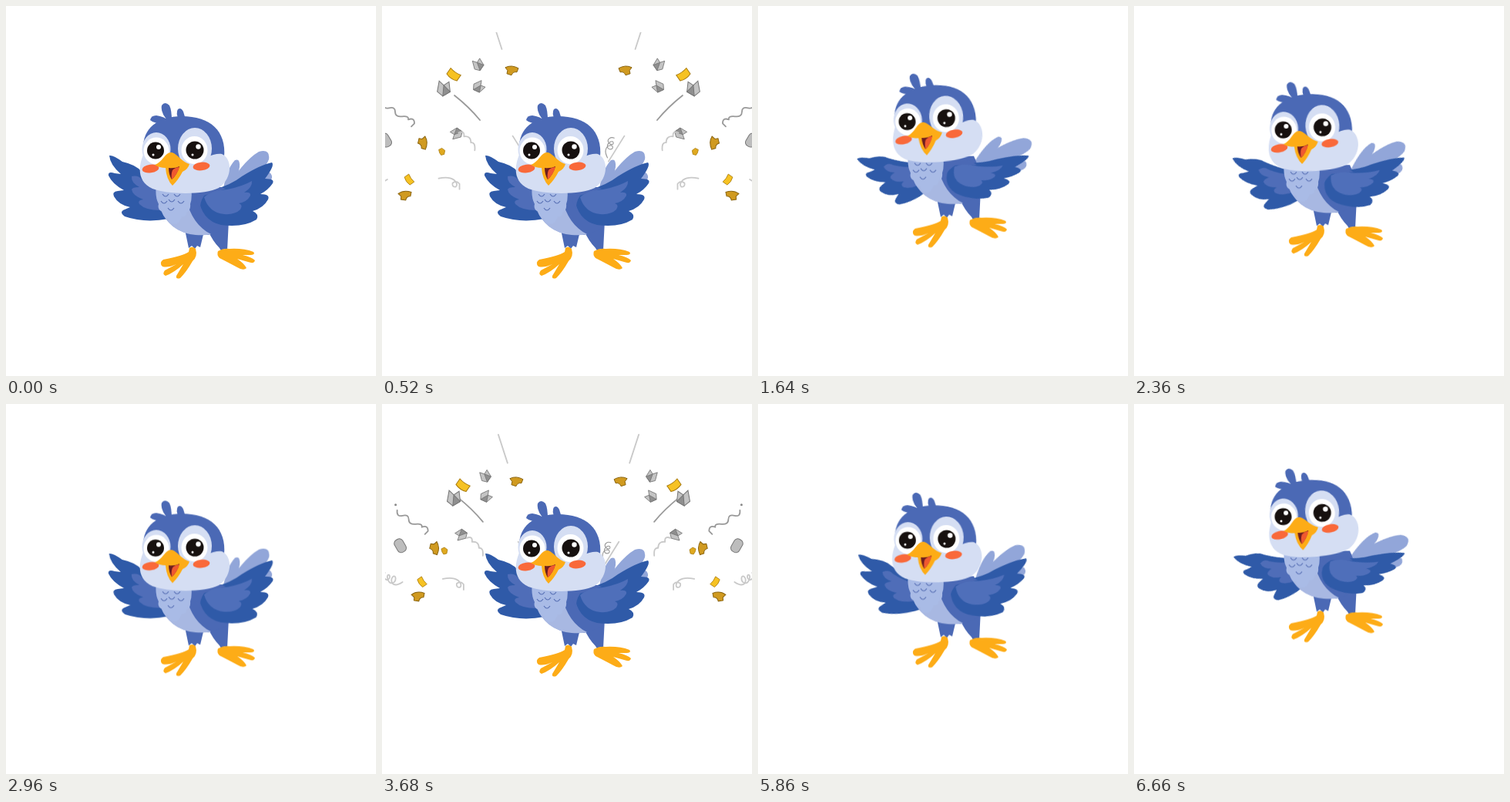
An HTML page without scripts that plays this animation: 480x480 px, repeating every 6780 ms.

```html
<!DOCTYPE html>
<html lang="en">
<head>
<meta charset="utf-8">
<title>Happy bird</title>
<style>
html, body { margin: 0; width: 100%; height: 100%; overflow: hidden; background: #fff; }
svg { display: block; width: 100vw; height: 100vh; }

/* Pose change: --up is the transform at the top of the hop */
.pose { animation: pose 6780ms infinite; }
@keyframes pose {
  0%, 15.04% { transform: none; animation-timing-function: ease; }
  29.5%, 31.56% { transform: var(--up); animation-timing-function: ease; }
  46.02%, 83.78% { transform: none; animation-timing-function: ease; }
  98.23%, 100% { transform: var(--up); }
}
#bird { --up: translateY(-44.5px); }
#head { --up: rotate(-5deg); transform-origin: 230px 195px; }
#tail { --up: rotate(25deg); transform-origin: 280px 242px; }
#wingL { --up: matrix(.671, -.49, .565, .833, 0, 0); transform-origin: 215px 250px; }
#wingR { --up: matrix(.833, .272, -.509, .778, 0, 0); transform-origin: 252px 245px; }

/* Confetti: --b to --e are the stops on the way out */
.burst use {
  --b: calc(var(--x) * 1px) calc(var(--y) * 1px);
  --c: calc(var(--x) * 2.3px) calc(var(--y) * 2.3px);
  --d: calc(var(--x) * 3px) calc(var(--y) * 3px);
  --e: calc(var(--x) * 4px) calc(var(--y) * 4px);
  animation: fly 6780ms linear infinite;
}
@keyframes fly {
  0%, 1.47% { translate: 0 0; scale: 0; animation-timing-function: cubic-bezier(.2, .3, .6, .9); }
  7.08% { translate: var(--b); scale: var(--s, 1); }
  15.93% { translate: var(--c); scale: 1; }
  17.7% { translate: var(--d); }
  21.24% { translate: var(--e); scale: 1; }
  21.25%, 43.66% { translate: 0 0; scale: 0; animation-timing-function: cubic-bezier(.2, .3, .6, .9); }
  54.28% { translate: var(--b); scale: var(--s, 1); }
  64.31% { translate: var(--c); scale: 1; }
  67.85% { translate: var(--d); }
  77.88% { translate: var(--e); scale: 1; }
  77.89%, 100% { translate: 0 0; scale: 0; }
}
.burst .streak1 { --x: -85; --y: -237; }
.burst .streak2 { --x: -55; --y: -100; --c: -161px -252px; rotate: -14deg; }
.burst .streak3 { --x: -127; --y: -158; --c: -185px -231px; }
.burst .flag1 { --x: -68; --y: -194; }
.burst .flag2 { --x: -174; --y: -108; rotate: 85deg; }
.burst .flag3 { --x: -195; --y: -45; rotate: -10deg; }
.burst .card1 { --x: -137; --y: -189; rotate: 35deg; }
.burst .card2 { --x: -190; --y: -64; --s: .75; rotate: 55deg; }
.burst .ash1 { --x: -108; --y: -201; rotate: 70deg; }
.burst .ash2 { --x: -107; --y: -175; rotate: 150deg; }
.burst .ash3 { --x: -149; --y: -173; --s: 1.3; rotate: 95deg; }
.burst .ash4 { --x: -139; --y: -125; --c: -232px -188px; --d: -238px -215px; rotate: -20deg; }
.burst .wave { --x: -202; --y: -143; }
.burst .dot { --x: -224; --y: -164; }
.burst .pill { --x: -218; --y: -111; rotate: 60deg; }
.burst .scrap { --x: -161; --y: -104; --c: -210px -127px; --d: -232px -129px; }
.burst .squig { --x: -120; --y: -110; }
.burst .loop { --x: -226; --y: -68; }
.burst .hook { --x: -150; --y: -62; --c: -230px -110px; }
.burst .coil { --x: -50; --y: -103; --s: .6; --c: -112px -224px; --d: -122px -246px; --e: -134px -285px; }

.line { fill: none; stroke: #999; stroke-width: 1.8; stroke-linecap: round; stroke-linejoin: round; }
.pale { stroke: #c9c9c9; }
.dark { fill: #2f5aa8; }
.blue { fill: #4b69b5; }
.soft { fill: #a8b8e2; }
.face { fill: #d5def3; }
.gold { fill: #fdac17; }
.tail { fill: #92a6d9; }
</style>
</head>
<body>
<svg viewBox="0 0 480 480">
<defs>
  <clipPath id="sky"><rect x="4" y="34" width="476" height="320"/></clipPath>
  <path id="flag" fill="#d09a20" stroke="#8a6410" d="M-8-4Q0-8 9-3L7 2Q2 1 0 6L-6 4L-5 0Z"/>
  <path id="card" fill="#f6c223" stroke="#a87b10" d="M-8-5Q0-3 8-5V4Q0 7-8 4Z"/>
  <path id="scrap" fill="#e0a91f" stroke="#a87b10" stroke-width=".8" d="M-4-3L0-5L4-2L3 3L-1 4L-3 1Z"/>
  <g id="ash" stroke="#777" stroke-width=".8">
    <path fill="#c4c4c4" d="M-7-5L3-7L8 0L4 6L-7 5L-3 0Z"/><path fill="#8f8f8f" d="M3-7L8 0L-3 0Z"/>
  </g>
  <rect id="pill" x="-9" y="-6" width="18" height="12" rx="5" fill="#bdbdbd" stroke="#777"/>
  <circle id="dot" r="1.5" fill="#888"/>
  <path id="streak1" class="line pale" d="M-6-18L6 19"/>
  <path id="streak3" class="line" d="M-17-16Q2-1 16 16"/>
  <path id="coil" class="line" d="M-8-20C0-23 7-17 4-11C1-5-8-5-6-11C-4-16 7-9 6-2C5 5-5 5-5-1C-5-7 7-5 9 3C12 10 8 16 6 21"/>
  <path id="loop" class="line pale" d="M-12-8C-15 0-9 4-6-1C-4-7-11-7-8 1C-5 9 2 5 2-1C1-7-6-1-2 6C2 10 8 6 11 4"/>
  <path id="wave" class="line" d="M-20-14Q-21-5-13-7T-5-2T4 4T12 8Q20 5 20 13L16 17"/>
  <path id="squig" class="line pale" d="M-12-11Q-4-14-5-6Q4-7 4 2Q10 1 9 12"/>
  <path id="hook" class="line pale" d="M-13-6Q0-9 7-4Q13 2 9 5Q4 5 5 0Q10-4 14 1V8"/>
</defs>

<g clip-path="url(#sky)">
  <g class="burst" transform="translate(242 295)">
    <use class="streak1" href="#streak1"/><use class="streak2" href="#streak1"/><use class="streak3" href="#streak3"/>
    <use class="flag1" href="#flag"/><use class="flag2" href="#flag"/><use class="flag3" href="#flag"/>
    <use class="card1" href="#card"/><use class="card2" href="#card"/>
    <use class="ash1" href="#ash"/><use class="ash2" href="#ash"/><use class="ash3" href="#ash"/><use class="ash4" href="#ash"/>
    <use class="wave" href="#wave"/><use class="dot" href="#dot"/><use class="pill" href="#pill"/>
    <use class="scrap" href="#scrap"/><use class="squig" href="#squig"/><use class="loop" href="#loop"/>
    <use class="hook" href="#hook"/><use class="coil" href="#coil"/>
  </g>
  <g class="burst" transform="matrix(-1 0 0 1 242 295)">
    <use class="streak1" href="#streak1"/><use class="streak2" href="#streak1"/><use class="streak3" href="#streak3"/>
    <use class="flag1" href="#flag"/><use class="flag2" href="#flag"/><use class="flag3" href="#flag"/>
    <use class="card1" href="#card"/><use class="card2" href="#card"/>
    <use class="ash1" href="#ash"/><use class="ash2" href="#ash"/><use class="ash3" href="#ash"/><use class="ash4" href="#ash"/>
    <use class="wave" href="#wave"/><use class="dot" href="#dot"/><use class="pill" href="#pill"/>
    <use class="scrap" href="#scrap"/><use class="squig" href="#squig"/><use class="loop" href="#loop"/>
    <use class="hook" href="#hook"/><use class="coil" href="#coil"/>
  </g>
</g>

<g id="bird" class="pose">
  <g id="tail" class="pose tail">
    <path d="M280 248Q285 212 297 200Q304 197 303 209Q300 228 288 248Z"/>
    <path d="M280 246Q307 201 328 189Q343 185 341 199Q336 214 290 248Z"/>
    <path d="M284 248Q320 221 342 216Q349 222 340 230Q320 243 290 250Z"/>
  </g>

  <g id="wingL" class="pose">
    <path class="dark" d="M134 194Q139 193 151 202Q169 206 176 215Q192 230 205 237L211 276Q180 282 154 273Q146 267 154 264L161 261Q146 258 140 247Q137 241 145 240L153 239Q138 231 133 220Q132 214 141 217L149 218Q135 206 134 194Z"/>
    <path fill="#4f6db8" d="M163 221Q172 219 177 226Q190 237 201 241L204 265Q182 266 173 257Q170 252 178 251Q164 246 163 238Q164 235 173 235Q162 229 163 221Z"/>
  </g>

  <path class="blue" d="M232 290L257 292L252 313L248 311L245 315L241 311L237 314Z"/>
  <path class="blue" d="M262 291L289 278L287 317L283 315L280 319L277 314Q268 305 262 291Z"/>
  <path class="gold" d="M238 314Q242 311 246 315Q249 325 242 331Q234 345 226 353Q220 355 221 350L230 335Q218 346 207 350Q202 348 206 343L221 335Q210 340 203 338Q198 333 204 329Q230 324 237 319Z"/>
  <path class="gold" d="M275 318Q282 314 290 315Q308 314 321 319Q324 322 318 323L307 323Q319 326 323 330Q322 335 314 332L300 328Q309 334 312 340Q308 344 300 339Q285 331 277 327Q273 323 275 318Z"/>

  <path class="blue" d="M197 235H280Q290 255 288 287Q270 299 246 297Q212 293 200 262Z"/>
  <path class="soft" d="M199 260Q211 294 246 297Q258 298 266 296C250 288 238 272 234 250Z"/>
  <path fill="#a9bbe6" d="M195 234H240Q242 249 239 257Q240 265 234 268Q234 274 228 273Q225 283 218 283Q211 282 210 275Q203 274 203 267Q196 264 198 257Q193 247 195 234Z"/>
  <path fill="none" stroke="#5870b5" stroke-width="1.2" d="M203 244q4 6 8 0m7 0q4 6 8 0M201 253q4 6 8 0m2-2q4 6 8 0m4 2q4 6 8 0M210 262q4 6 8 0"/>

  <g id="wingR" class="pose">
    <path class="dark" d="M250 248Q255 238 270 238Q292 232 306 221Q330 206 345 203Q349 207 336 224Q349 224 346 230Q340 239 330 244Q343 244 340 251Q334 262 320 266Q329 270 325 277Q307 288 279 284Q253 278 250 248Z"/>
    <path class="blue" d="M247 248Q248 236 266 234Q278 234 285 237Q268 242 257 246Q251 255 252 264Q247 256 247 248Z"/>
    <path fill="#4f6fba" d="M257 248Q266 239 287 238Q307 234 319 227Q320 235 309 242Q318 241 317 246Q313 254 302 256Q308 258 304 264Q297 271 283 270Q263 268 257 248Z"/>
  </g>

  <g id="head" class="pose">
    <g class="blue">
      <path d="M211 150Q200 139 202 129Q206 123 212 129Q215 135 215 149Z"/>
      <path d="M209 153Q192 153 187 148Q188 142 195 142Q205 143 213 150Z"/>
      <path d="M224 148Q220 138 223 134Q227 131 230 137Q231 143 235 148Z"/>
      <path d="M178 185C177 159 197 143 228 143C265 143 286 162 283 196L270 225H190Z"/>
    </g>
    <g class="face">
      <ellipse cx="195" cy="186" rx="18.5" ry="22"/>
      <ellipse cx="245" cy="185" rx="22" ry="27"/>
      <path d="M178 193C171 210 171 228 190 237C210 245 259 245 276 236C294 224 294 198 280 192C270 190 254 200 240 202Q228 205 216 203Q190 202 178 193Z"/>
    </g>
    <g fill="#fff"><ellipse cx="195" cy="188" rx="16.5" ry="17.5"/><ellipse cx="244.5" cy="187" rx="17" ry="18"/></g>
    <g fill="#17110f"><circle cx="194" cy="187.5" r="11"/><circle cx="245" cy="187" r="11.5"/></g>
    <g fill="#fff">
      <circle cx="198" cy="183" r="3"/><circle cx="249.5" cy="182.5" r="3.2"/>
      <circle cx="191" cy="193" r="1.5"/><circle cx="242" cy="193" r="1.5"/>
    </g>
    <g fill="#f9693a">
      <ellipse cx="187.5" cy="211" rx="11" ry="5.3" transform="rotate(-8 187.5 211)"/>
      <ellipse cx="253.5" cy="208" rx="11" ry="5.3" transform="rotate(-6 253.5 208)"/>
    </g>
    <path class="gold" d="M193 206C204 202 206 190 214 190C221 190 226 201 238 205Q236 212 229 215Q224 225 216 233Q208 225 207 210Q199 210 193 206Z"/>
    <path fill="#6b1c20" d="M211 210Q219 211 225 208Q222 219 215 225Q211 219 211 210Z"/>
    <path fill="#f0592f" d="M216 213Q220 209 225 209Q222 219 215 225Q214 218 216 213Z"/>
  </g>
</g>
</svg>
</body>
</html>
```
